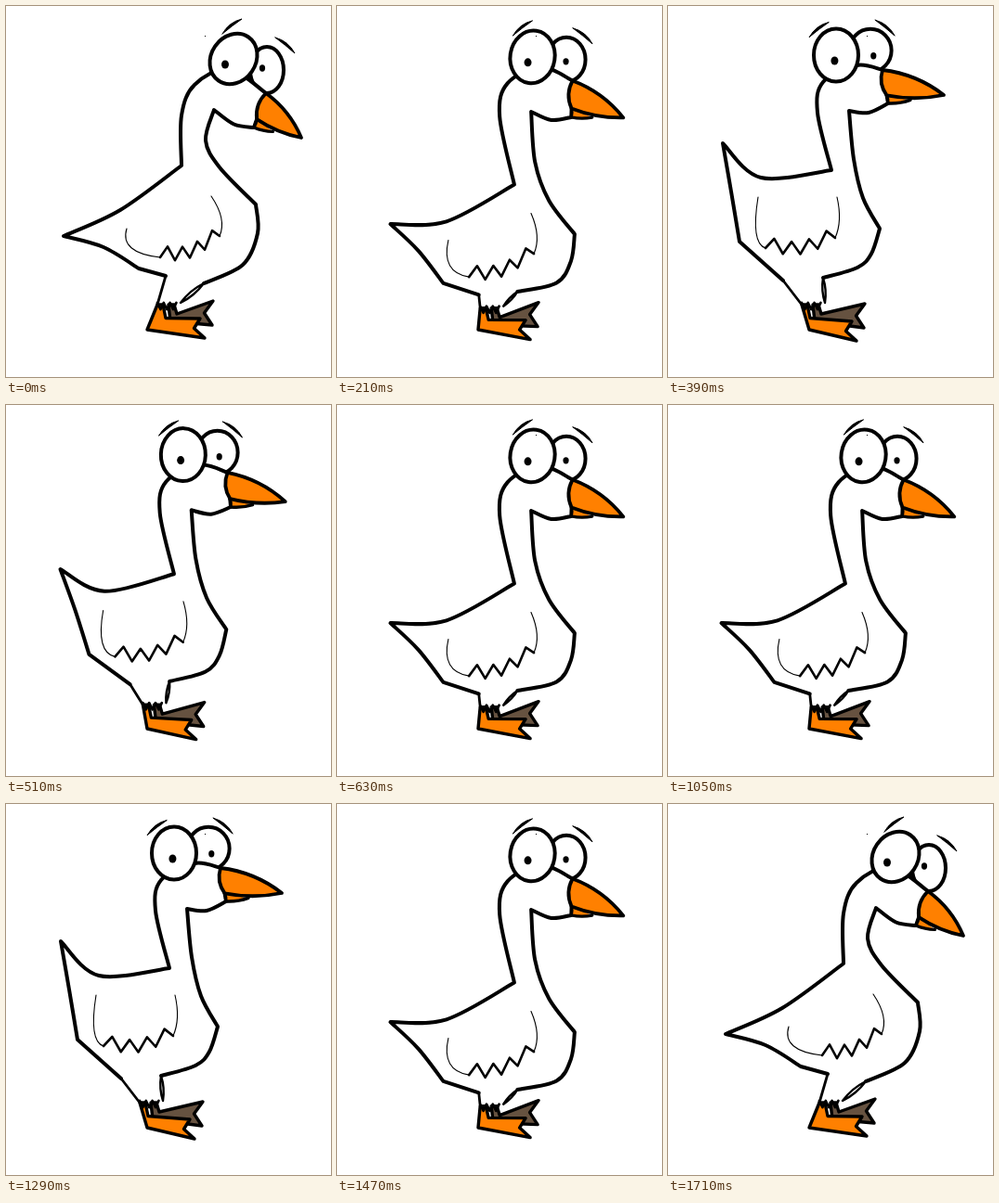
Recreate the animation shown at these times as an HTML page with a canvas. Size 350 px wide and 400 px high, loop 1800 ms.

```html
<!DOCTYPE html>
<html lang="en">
<head>
<meta charset="utf-8">
<title>Bobbing goose</title>
<style>
html, body { margin: 0; width: 100%; height: 100%; overflow: hidden; background: #fff }
canvas { display: block }
</style>
</head>
<body>
<canvas id="stage" width="350" height="400"></canvas>
<script>
const ctx = document.getElementById('stage').getContext('2d');
const ORANGE = '#ff8000', BROWN = '#665240', WHITE = '#fff', BLACK = '#000';
const HEEL = [152, 349];

// Joints: x, y with the head down, then x, y with the head up
const joints = {
  eye: [245, 57, 181, 53],        farEye: [281, 69, 218, 48],
  crown: [240, 68, 203, 64],      occiput: [203, 85, 167, 82],
  beak: [280, 94, 231, 69],       jaw: [267, 131, 237, 105],
  tip: [318, 142, 297, 96],       chin: [224, 112, 195, 113],
  nape: [189, 118, 161, 115],     throat: [215, 145, 200, 165],
  shoulder: [189, 172, 176, 177], bend: [230, 174, 210, 207],
  back: [123, 220, 100, 185],     chest: [269, 214, 228, 240],
  tail: [62, 248, 59, 148],       belly: [271, 245, 219, 267],
  flank: [105, 260, 68, 200],     low: [255, 279, 204, 282],
  hip: [143, 283, 77, 254],       under: [213, 299, 167, 293],
  rump: [172, 291, 124, 296],     ankle: [163, 322, 144, 322],
  toe: [214, 358, 203, 361],
  wingStart: [130, 240, 97, 206], wingLow: [166, 271, 105, 261],
  wingEnd: [230, 248, 180, 250],  wingTop: [221, 205, 182, 206]
};

const clamp = v => Math.max(0, Math.min(1, v));
const mix = (a, b, k) => [a[0] + (b[0] - a[0]) * k, a[1] + (b[1] - a[1]) * k];
const add = (a, x, y) => [a[0] + x, a[1] + y];

// Halfway up, the trunk sinks and the tail lags; head and feet stay out of it
function dip([x, y]) {
  const weight = clamp((y - 107) / 68) * clamp((330 - y) / 50);
  return [Math.min(9, (x - 75) / 5) * weight, (18 + 23 * clamp((180 - x) / 120)) * weight];
}

// p: 0 head down, 1 halfway, 2 head up
function pose(p) {
  const rise = p * 7 / 13, sink = p < 1 ? p : 1 - (p - 1) * 7 / 6;
  const rig = {};
  for (const name in joints) {
    const [x, y, upX, upY] = joints[name];
    const [dx, dy] = dip([(x + upX) / 2, (y + upY) / 2]);
    rig[name] = add(mix([x, y], [upX, upY], rise), dx * sink, dy * sink);
  }
  return rig;
}

function begin(p) { ctx.beginPath(); ctx.moveTo(...p); }

function lines(...pts) { pts.forEach(p => ctx.lineTo(...p)); }

// Smooth curve through the points, the first being the current one
function spline(...pts) {
  for (let i = 0; i < pts.length - 1; i++) {
    const a = pts[i], b = pts[i + 1], before = pts[i - 1] || a, after = pts[i + 2] || b;
    ctx.bezierCurveTo(...add(a, (b[0] - before[0]) / 6, (b[1] - before[1]) / 6),
      ...add(b, (a[0] - after[0]) / 6, (a[1] - after[1]) / 6), ...b);
  }
}

// Curve from a to b, bowed to its left by a share of its length
function arc(a, b, bow) {
  const control = add(mix(a, b, .5), (b[1] - a[1]) * bow, (a[0] - b[0]) * bow);
  ctx.quadraticCurveTo(...control, ...b);
}

function paint(fill, width) {
  if (fill) { ctx.fillStyle = fill; ctx.fill(); }
  if (width) { ctx.lineWidth = width; ctx.stroke(); }
}

function oval([x, y], rx, ry, tilt, fill, width) {
  ctx.beginPath();
  ctx.ellipse(x, y, rx, ry, tilt, 0, Math.PI * 2);
  paint(fill, width);
}

function lens(a, b, bowOut, bowBack, fill, width) {
  begin(a);
  arc(a, b, bowOut);
  arc(b, a, bowBack);
  paint(fill, width);
}

function foot(ankle, heel, toe, tip, fill) {
  begin(ankle);
  lines(heel, toe, add(mix(toe, tip, .5), -9, 0), tip,
    [ankle[0] + 9, (ankle[1] + heel[1]) / 2 + 1], add(ankle, 6, 0));
  ctx.closePath();
  paint(fill, 3.4);
}

function drawLegs({ ankle, toe, under, rump }) {
  foot(add(ankle, 12, 0), add(ankle, 14, 18), add(toe, 8, -14), add(toe, 9, -40), BROWN);
  lens(under, add(ankle, 25, -2), .12, .12, WHITE, 2.4);
  foot(ankle, HEEL, toe, add(toe, -5, -21), ORANGE);
  begin(rump);
  lines(ankle);
  for (let i = 0; i < 7; i++) lines(add(ankle, i * 3.4, i % 2 ? 5 : -2));
  paint(null, 2.8);
}

function drawBody(r) {
  begin(r.rump);
  lines(r.hip);
  spline(r.hip, r.flank, r.tail);
  spline(r.tail, r.back, r.shoulder);
  spline(r.shoulder, r.nape, r.occiput, r.crown, r.beak);
  lines(r.jaw);
  spline(r.jaw, add(mix(r.jaw, r.chin, .5), 0, 6), r.chin);
  spline(r.chin, r.throat, r.bend, r.chest);
  spline(r.chest, r.belly, r.low, r.under);
  paint(WHITE, 4);
}

function drawWing({ wingStart, wingLow, wingEnd, wingTop }) {
  begin(wingStart);
  ctx.quadraticCurveTo(wingStart[0] - 8, wingLow[1] - 5, ...wingLow);
  ctx.moveTo(...wingEnd);
  ctx.quadraticCurveTo(...add(wingEnd, 8, -18), ...wingTop);
  paint(null, 1.1);
  begin(wingLow);
  for (let i = 1; i < 9; i++) {
    const u = i / 8, sag = 48 * u * (1 - u);
    lines(add(mix(wingLow, wingEnd, u), 0, sag - (i % 2 ? 14 : 0)));
  }
  paint(null, 2.6);
}

function drawBeak({ beak, jaw, tip }) {
  const mouth = mix(beak, jaw, .76);
  begin(mouth);
  arc(mouth, jaw, .1);
  arc(jaw, mix(jaw, tip, .4), -.1);
  paint(ORANGE, 3.4);
  begin(beak);
  arc(beak, tip, .14);
  arc(tip, mouth, .1);
  arc(mouth, beak, .25);
  paint(ORANGE, 3.8);
}

function drawFace(eye, p) {
  oval(eye, 24, 28.5, .6 * (1 - p / 2) ** 2, WHITE, 4);
  oval(add(eye, 4 * p - 9, 6), 4, 4.5, 0, BLACK);
  oval(add(eye, 31 + 5 * p, 10 - 5 * p), 3.1, 3.7, 0, BLACK);
  const brow = add(eye, -12 - 9 * p, 4 * p - 27);
  const farBrow = add(eye, 45 - 1.5 * p, -23 - 8 * p);
  lens(brow, add(brow, 21, -16), .22, -.02, BLACK, 1);
  lens(farBrow, add(farBrow, 21, 17), .22, -.02, BLACK, 1);
}

function draw(t) {
  const beat = Math.min(t, 1680) % 840 / 210;
  const p = beat < 2 ? beat : 4 - beat;
  const rig = pose(p);

  ctx.fillStyle = WHITE;
  ctx.fillRect(0, 0, 350, 400);
  ctx.strokeStyle = BLACK;
  ctx.lineJoin = ctx.lineCap = 'round';

  oval(rig.farEye, 18 + 2.5 * p, 25 - p, 0, WHITE, 4);
  drawBody(rig);
  drawLegs(rig);
  drawWing(rig);
  drawBeak(rig);
  drawFace(rig.eye, p);
  ctx.fillStyle = BLACK;
  ctx.fillRect(214, 32, 1, 1);
}

function tick() {
  const t = performance.now() % 1800;
  draw(Math.min(1710, Math.floor(t / 30) * 30));
  requestAnimationFrame(tick);
}
tick();
</script>
</body>
</html>
```
